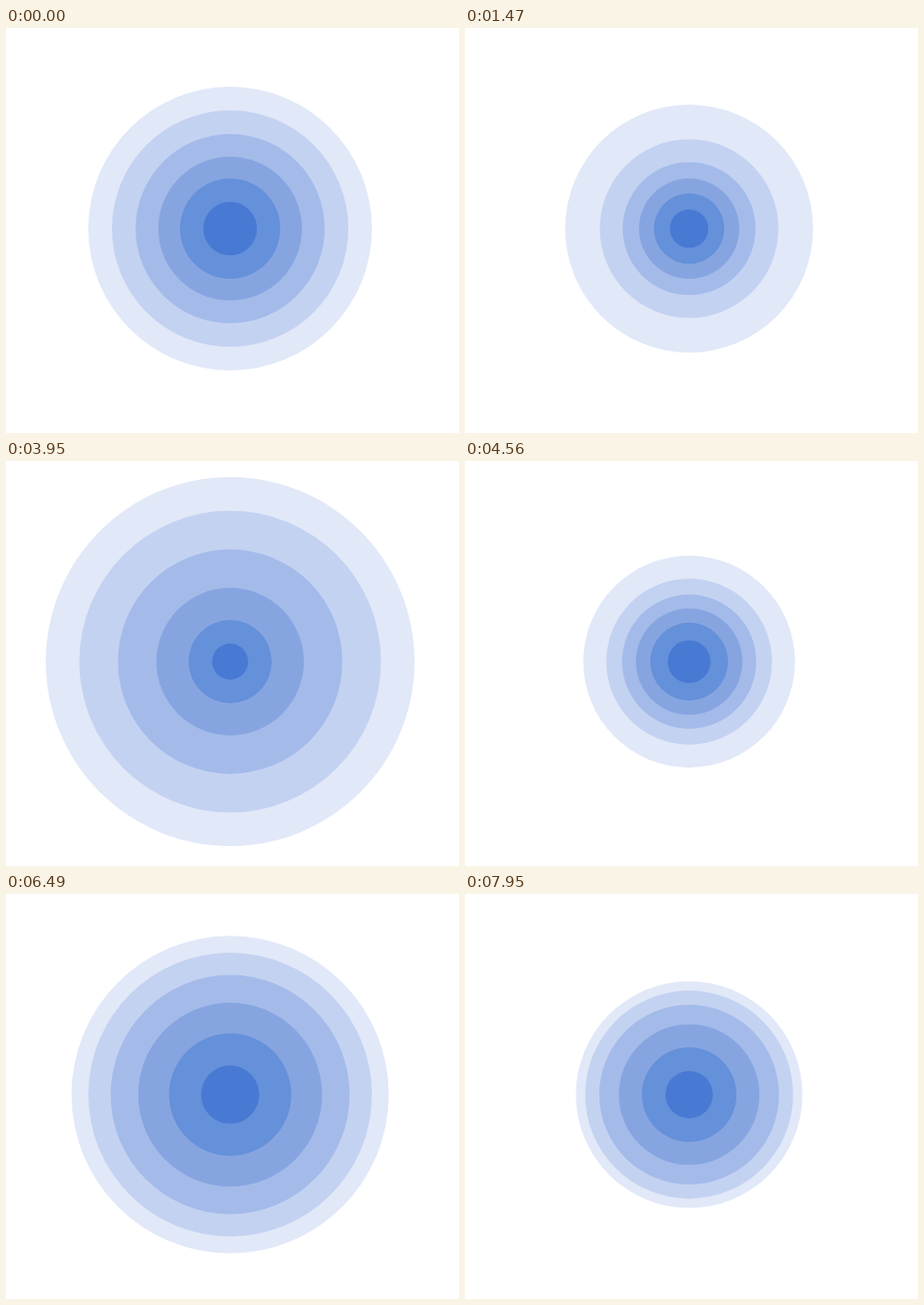
An HTML page with a canvas for the animation above (8000 ms loop, 479 px wide and 428 px high).

```html
<!DOCTYPE html>
<html lang="en">
<head>
<meta charset="utf-8">
<title>Pulsing rings</title>
<style>
  html, body { margin: 0; width: 100%; height: 100%; overflow: hidden; background: #fff; }
  canvas { display: block; width: 479px; height: 428px; }
</style>
</head>
<body>
<canvas id="stage" width="479" height="428"></canvas>
<script>
const ctx = document.getElementById('stage').getContext('2d');
const LOOP = 8000;
const STEP = 77.25;        // the motion advances in held steps
const FIRST_PULSE = -351;  // a pulse is already under way at time 0
const PERIOD = 2956;
const SEGMENT = 749;       // time from one scale stop to the next
const STAGGER = 120;       // delay from each ring to the next one out
const STOPS = [1, 1.3, 0.7, 1];
const COLORS = ['#4879d3', '#6590da', '#86a5e0', '#a4bbea', '#c4d2f1', '#e1e8f8'];
const CENTER = { x: 237, y: 212 };
const RING = 25;

// cubic-bezier(.42, 0, .58, 1)
function easeInOut(x) {
  let lo = 0, hi = 1;
  for (let i = 0; i < 24; i++) {
    const p = (lo + hi) / 2, q = 1 - p;
    const bx = 1.26 * q * q * p + 1.74 * q * p * p + p * p * p;
    if (bx < x) lo = p; else hi = p;
  }
  return lo * lo * (3 - 2 * lo);
}

function scaleAt(time) {
  const u = time / SEGMENT;
  if (u <= 0 || u >= STOPS.length - 1) return 1;
  const i = Math.floor(u);
  return STOPS[i] + (STOPS[i + 1] - STOPS[i]) * easeInOut(u - i);
}

function draw(time) {
  const phase = (time - FIRST_PULSE) % PERIOD;
  ctx.fillStyle = '#fff';
  ctx.fillRect(0, 0, 479, 428);
  for (let i = COLORS.length - 1; i >= 0; i--) {
    ctx.fillStyle = COLORS[i];
    ctx.beginPath();
    ctx.arc(CENTER.x, CENTER.y, RING * (i + 1) * scaleAt(phase - i * STAGGER), 0, Math.PI * 2);
    ctx.fill();
  }
}

let start = null;
function tick(now) {
  if (start === null) start = now;
  const time = (now - start) % LOOP;
  draw(Math.floor((time + 20) / STEP) * STEP);
  requestAnimationFrame(tick);
}
draw(0);
requestAnimationFrame(tick);
</script>
</body>
</html>
```
